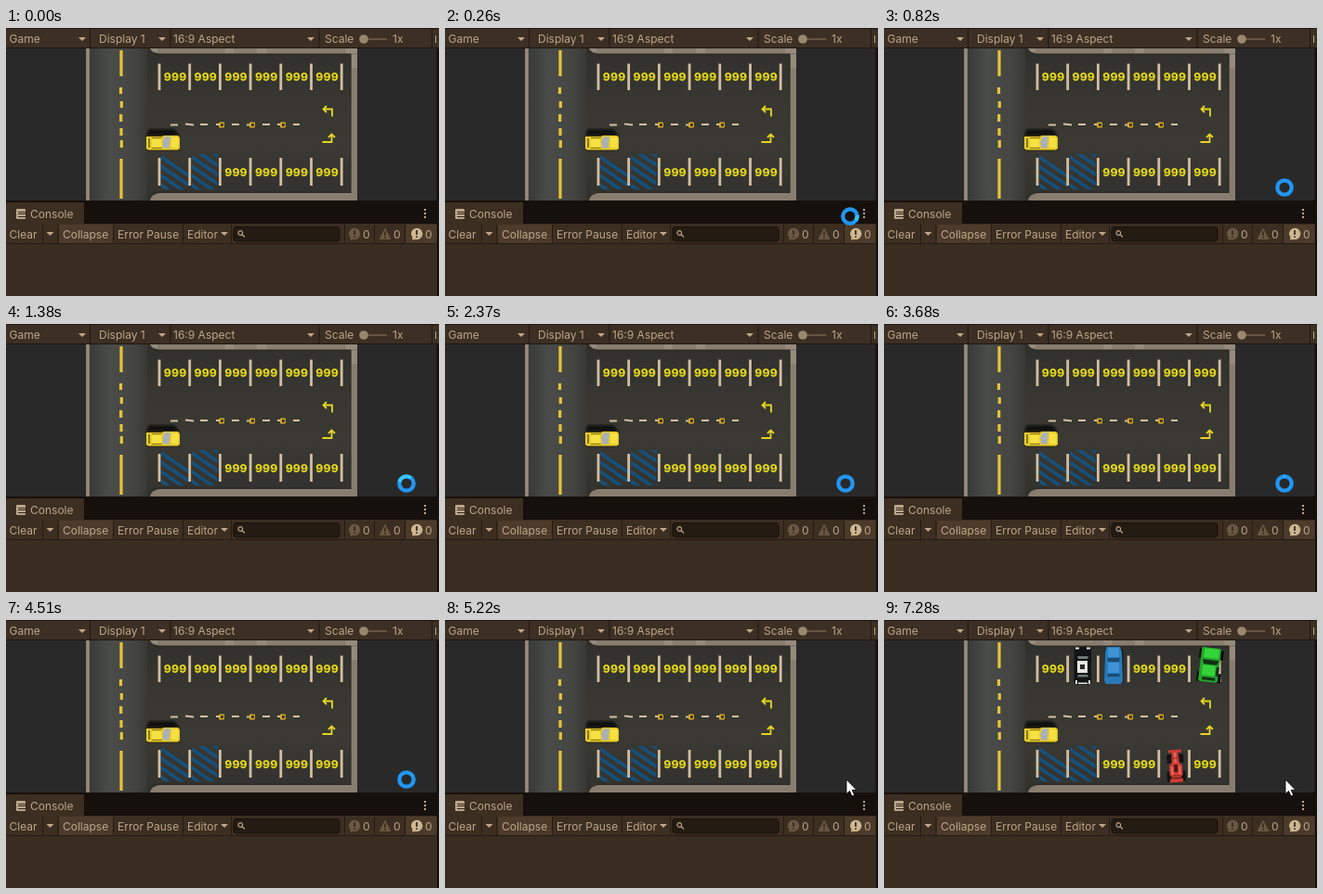
Write an HTML page that moves like this. It is 466 by 289 pixels and loops after 8 s.

```html
<!DOCTYPE html>
<html lang="en">
<head>
<meta charset="utf-8">
<title>Parking scene</title>
<style>
  html, body { margin: 0; width: 100%; height: 100%; overflow: hidden; background: #392d22; }
  svg { display: block; width: 466px; height: 289px; }
  text { font: 12px Inter, "Open Sans", sans-serif; fill: #bea688; }
  .num { font-weight: 800; font-size: 12.2px; letter-spacing: .1px; fill: #e2d51b; text-anchor: middle; }
</style>
</head>
<body>
<svg viewBox="0 0 466 289">
  <defs>
    <linearGradient id="road">
      <stop offset="0" stop-color="#383a38"/><stop offset=".35" stop-color="#4a4c4a"/>
      <stop offset=".75" stop-color="#444541"/><stop offset="1" stop-color="#383833"/>
    </linearGradient>
    <linearGradient id="lot" x2="0" y2="1">
      <stop offset="0" stop-color="#30302c"/><stop offset=".3" stop-color="#373631"/>
      <stop offset=".65" stop-color="#3a3933"/><stop offset="1" stop-color="#31312e"/>
    </linearGradient>
    <filter id="soft" x="-20%" y="-80%" width="140%" height="260%"><feGaussianBlur stdDeviation="1"/></filter>
    <clipPath id="view"><path d="M86 22H378V186H86Z"/></clipPath>
    <clipPath id="bays"><path d="M167 137H172L196 153V174H167ZM200 136H228V174H200Z"/></clipPath>
  </defs>

  <!-- game view -->
  <path fill="#292929" d="M0 22H464V187H0Z"/>
  <g clip-path="url(#view)">
    <path fill="#897d6f" d="M86 22H378V186H86Z"/>
    <path fill="url(#road)" d="M90 22H153V186H90Z"/>
    <path fill="url(#lot)" d="M152 22H155Q158 27.500 166 27.500H371.500V178H166Q157 178 155 186H152Z"/>
    <path fill="none" stroke="#22241f" stroke-opacity=".3" stroke-width="1.500" d="M160 27Q162 29 166 29H371V177H166Q162 177 159 180"/>
    <path fill="#a3978a" opacity=".5" d="M155 22H163V26H158ZM236 22H245V27H236ZM270 22H280V27H270ZM366 22H378V27H366ZM372 29H378V43H372ZM87 22H89V186H87Z"/>
    <path stroke="#e6c43a" stroke-width="3.200" d="M124 24V52M123.500 64V71M124.300 79V86M123.700 93V101M124 108V116M124.300 121V129M124 141V184"/>
    <g clip-path="url(#bays)"><path id="hatch" fill="none" stroke="#15507c" stroke-width="3.700"/></g>
    <path id="stalls" stroke="#d3bea2" stroke-width="2.800"/>
    <path stroke="#d0bfa3" stroke-width="2.200" d="M177 104.500H185M193 103.500L202 104.500M209 104H217M226 104H234M243 104H251M259 104.500H267M276 104H284M292 104H300M309 104H316"/>
    <g id="studs"></g>
    <g fill="none" stroke="#e4d422" stroke-width="1.800">
      <path d="M342 87.500H351V95.500M345 84L341.500 87.500L345 91"/>
      <path d="M340.500 123H350.500V116M347 118L350.500 114.500L354 118"/>
    </g>
    <g id="free"></g>
    <g id="always"></g>

    <!-- taxi -->
    <path fill="#080908" opacity=".9" filter="url(#soft)" d="M155 109H181L186 115V119H152V112Z"/>
    <rect x="151" y="115" width="36" height="17.500" rx="2" fill="#28240f"/>
    <path fill="#e9cd2b" d="M151 117H168L170 116H185L187 118V130L185 131.500H153L151 130Z"/>
    <path fill="#8d771a" d="M153 119H155V129H153ZM157 118H168V119H157ZM157 129H168V130H157Z"/>
    <path fill="#a9b1b6" d="M168.500 122L171 117H177L175.500 129.500H169Z"/>
    <path fill="#f6e143" d="M157 120H167V128H157ZM178 118H185V129H178Z"/>

    <g id="parked">
      <!-- patrol car -->
      <rect x="204.500" y="29" width="18.500" height="40.500" rx="3" fill="#121314"/>
      <path fill="#e6e5df" d="M208 44H219V57H208ZM206 29.500H210V31.500H206ZM218 29.500H222V31.500H218ZM206 65H208V69H206ZM220 65H222V69H220ZM209 67.500H219V69H209Z"/>
      <path fill="#6f777a" d="M208 39H220L219 42H209ZM209 59H219L220 61.500H208Z"/>
      <path fill="#26282a" d="M211 48H216V53H211Z"/>
      <!-- blue car -->
      <rect x="237.500" y="31" width="20" height="38" rx="3" fill="#0b0c0c" opacity=".7"/>
      <path fill="#2879b8" d="M240 29H254L256 34L257 66L255 69H239L237 66L238 34Z"/>
      <path fill="#3f93d2" d="M241 30H253V40H241ZM241 46H253V57H241Z"/>
      <path fill="#1c4b72" d="M240 41H254L253 45H241ZM241 58H253L254 61H240Z"/>
      <!-- green jeep -->
      <g transform="rotate(7 351 49)">
        <path fill="#090b08" d="M338 32H344V42H338ZM358 32H364V42H358ZM338 57H344V67H338ZM358 57H364V67H358Z"/>
        <rect x="340" y="30" width="21" height="37" rx="2" fill="#23a52a"/>
        <path fill="#35d33a" d="M343 31H359V41H343ZM343 49H357V60H343Z"/>
        <path fill="#123016" d="M342 43H360L358 48H344ZM358 50H361V60H358ZM344 62H358V65H344Z"/>
      </g>
      <!-- racing car -->
      <g transform="rotate(-4 314 158)">
        <path fill="#131312" d="M305 145H310V154H305ZM318 145H323V154H318ZM304 163H310V174H304ZM318 163H324V174H318Z"/>
        <path fill="#cf3c34" d="M307 140H321V143H317L318 154L321 157V167L318 171H321V175H307V171H310L307 167V157L310 154L311 143H307Z"/>
        <path fill="#ea6a5f" d="M313 143H315V154H313ZM309 158H311V167H309ZM317 158H319V167H317Z"/>
        <path fill="#4c1a17" d="M312 156H316V164H312ZM310 170H318V171H310Z"/>
        <path stroke="#8e251f" d="M309 149H319M309 168H319"/>
      </g>
    </g>
  </g>

  <!-- top bar -->
  <path fill="#3c2f23" d="M0 0H466V21.500H0Z"/>
  <path fill="#1e1711" d="M0 0H466V1H0ZM0 21H466V22H0ZM90 1H91V21H90ZM176.500 1H177.500V21H176.500ZM336.500 1H337.500V21H336.500ZM458 1H459V21H458Z"/>
  <text x="3.500" y="16">Game</text>
  <text x="100" y="16">Display 1</text>
  <text x="180" y="16">16:9 Aspect</text>
  <text x="343" y="16">Scale</text>
  <text x="416" y="16">1x</text>
  <path fill="#bea688" d="M78 10H86L82 14ZM164 10H172L168 14ZM324 10H332L328 14ZM462 8H463V16H462Z"/>
  <path stroke="#655340" stroke-width="2" d="M385 12H410"/>
  <circle cx="385" cy="12" r="4.800" fill="#9a866c"/>

  <!-- console -->
  <path fill="#16100c" d="M0 186H466V211H0Z"/>
  <path fill="#3c2e21" d="M0 188H84V211H0ZM0 211H466V233H0Z"/>
  <path fill="#392d22" d="M0 233H466V289H0Z"/>
  <rect x="11" y="195" width="10" height="11" rx="1" fill="#bea688"/>
  <path stroke="#3c2e21" d="M13 198.500H21M13 200.500H21M13 203.500H21"/>
  <text x="26" y="205">Console</text>
  <path fill="#bea688" d="M450 195H452V197H450ZM450 199H452V201H450ZM450 203H452V205H450Z"/>
  <path fill="#4c3b2a" d="M57 212H115V232H57ZM430 212H463V232H430Z"/>
  <path fill="#241b13" d="M0 232H466V233H0ZM39 212H40V232H39ZM55.500 212H56.500V232H55.500ZM115 212H116V232H115ZM190 212H191V232H190ZM242 212H243V232H242ZM364 212H365V232H364ZM396 212H397V232H396ZM429 212H430V232H429Z"/>
  <text x="3.500" y="227">Clear</text>
  <text x="61" y="227">Collapse</text>
  <text x="120" y="227">Error Pause</text>
  <text x="195" y="227">Editor</text>
  <path fill="#bea688" d="M43.500 220H51.500L47.500 224ZM231 220H239L235 224Z"/>
  <rect x="245" y="214.500" width="114" height="15.500" rx="3" fill="#241b13" stroke="#17110c"/>
  <path fill="none" stroke="#bea688" stroke-width="1.200" d="M254 222.500L257 225.500M250 221a2.300 2.300 0 1 0 4.600 0a2.300 2.300 0 1 0 -4.600 0"/>
  <path fill="#6b5842" d="M370 228.500L370.500 226A6.200 6.200 0 1 1 374 228ZM408 215.500L414.500 228H401.500Z"/>
  <path fill="#cdb791" d="M437 228.500L437.500 226A6.200 6.200 0 1 1 441 228Z"/>
  <path stroke="#3c2e21" stroke-width="1.800" d="M375 218V223M375 224.500V226M408 219.500V224M408 225V226.700M442 218V223M442 224.500V226"/>
  <text x="384" y="227">0</text>
  <text x="417" y="227">0</text>
  <text x="451" y="227">0</text>
  <path fill="#15100c" d="M463.500 22H466V211H463.500ZM464 211H466V289H464Z"/>

  <!-- pointers -->
  <g id="busy" fill="none">
    <circle r="7.700" stroke="#2196f3" stroke-width="4.300"/>
    <circle id="glint" r="7.700" stroke="#35c5fa" stroke-width="4.100" pathLength="100"/>
  </g>
  <path id="arrow" fill="#fff" stroke="#000" stroke-width=".8" d="M432 172V187.500L435.500 184.300L438 190L440.600 188.800L438.100 183.300H442.800Z"/>
</svg>
<script>
  const $ = id => document.getElementById(id);
  const LOOP = 8000, TICK = 70, ENTER = 70, READY = 5220, CARS = 7280;
  const PITCH = 32.7;

  // scenery built from simple rules
  let lines = '', stripes = '';
  for (let i = 0; i < 7; i++) {
    const x = 165 + i * PITCH;
    lines += `M${x} 38.5V67M${x} 140V170`;
  }
  for (const x of [165, 198])
    for (let y = 108; y < 182; y += 10) stripes += `M${x} ${y}l34 23`;
  $('stalls').setAttribute('d', lines);
  $('hatch').setAttribute('d', stripes);
  $('studs').innerHTML = [232, 265, 298].map(x =>
    `<rect x="${x - 3}" y="101.500" width="6" height="6" rx="1" fill="#d3a723"/>` +
    `<path fill="#453a1a" d="M${x - 1} 103h3v3h-3z"/>`).join('');

  const label = (i, y) => `<text class="num" x="${182.1 + i * PITCH}" y="${y}">999</text>`;
  const row = (slots, y) => slots.map(i => label(i, y)).join('');
  $('always').innerHTML = row([0, 3, 4], 57) + row([2, 3, 5], 160);
  $('free').innerHTML = row([1, 2, 5], 57) + row([4], 160);

  const show = (id, on) => $(id).style.display = on ? '' : 'none';

  function draw(time) {
    const t = Math.floor(time / TICK) * TICK;
    // pointer glides up from the console, then rests
    const p = Math.min(1, Math.max(0, (t - ENTER) / 420));
    const left = (1 - p) ** 2;
    $('busy').setAttribute('transform', `translate(${431 + 11 * left} ${172 + 70 * left})`);

    // a bright arc grows, sweeps round and shrinks
    const phase = ((t - 770) / 720 % 1 + 1) % 1;
    const arc = 45 * Math.max(0, Math.sin((phase - 0.15) / 0.85 * Math.PI));
    $('glint').setAttribute('stroke-dasharray', `${arc} ${100 - arc}`);
    $('glint').setAttribute('transform', `rotate(${phase * 360 - 90})`);
    show('glint', arc > 0.1);

    show('busy', time >= ENTER && time < READY);
    show('arrow', time >= READY);
    show('parked', time >= CARS);
    show('free', time < CARS);
  }

  const start = performance.now();
  function tick() {
    draw((performance.now() - start) % LOOP);
    requestAnimationFrame(tick);
  }
  tick();
</script>
</body>
</html>
```
